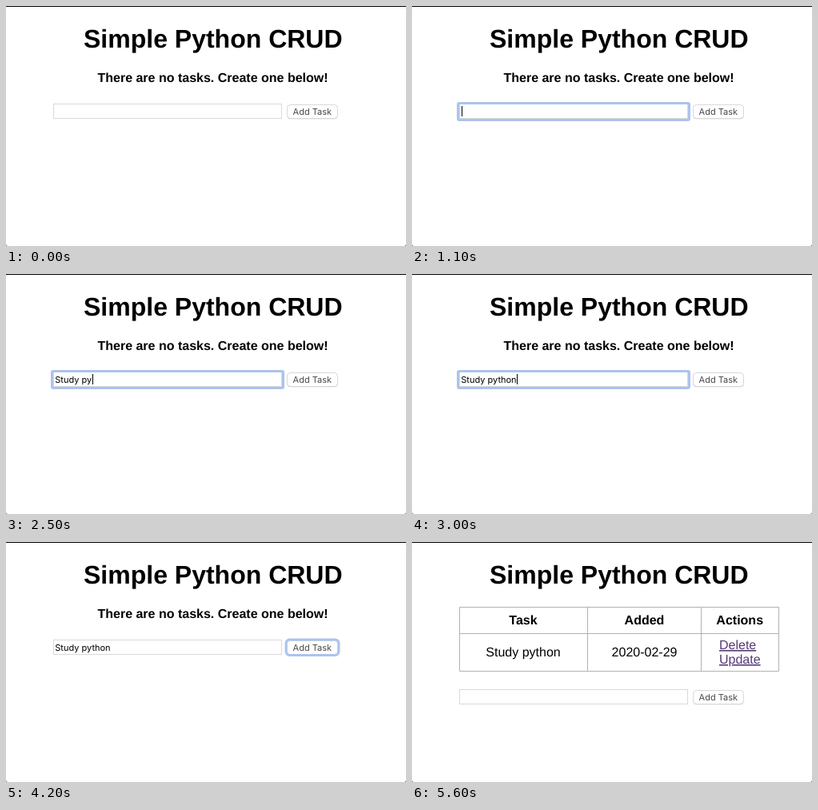
These frames come from a looping animation (500 px wide and 300 px high, 8 s). An HTML page:

```html
<!DOCTYPE html>
<html lang="en">
<head>
<meta charset="utf-8">
<title>Simple Python CRUD</title>
<style>
  html, body { margin: 0; width: 100%; height: 100%; overflow: hidden; background: #fff; }
  svg { display: block; width: 500px; height: 300px; text-rendering: geometricPrecision; }
  text { font: 16px "Liberation Sans", Arial, sans-serif; text-anchor: middle; }
  .bold { font-weight: bold; }
  .title { font-size: 32px; font-weight: bold; }
  .ui text { font: 11px Inter, sans-serif; text-anchor: start; }
  .link { fill: #553a78; text-anchor: start; text-decoration: underline; }
  .grid { fill: none; stroke: #b2b2b2; }
  .ring { fill: none; stroke: #adc3ee; stroke-width: 3; }
</style>
</head>
<body>
<svg viewBox="0 0 500 300">
  <rect width="500" height="1"/>
  <path d="M0 298v2h2zM500 298v2h-2z" fill="#999"/>
  <text class="title" x="258.8" y="52">Simple Python CRUD</text>

  <text id="empty" class="bold" x="258.5" y="95">There are no tasks. Create one below!</text>

  <g id="table">
    <path class="grid" d="M59.5 81.5h399v80h-399zM59.5 114.5h399M219.5 81.5v80M361.5 81.5v80"/>
    <text class="bold" x="139" y="103">Task</text>
    <text class="bold" x="290.5" y="103">Added</text>
    <text class="bold" x="409.7" y="103">Actions</text>
    <text x="139" y="143">Study python</text>
    <text x="290.5" y="143">2020-02-29</text>
    <text class="link" x="384" y="134">Delete</text>
    <text class="link" x="384" y="152">Update</text>
  </g>

  <g id="form" class="ui">
    <rect x="59.5" y="122.5" width="285" height="18" fill="#fff" stroke="#d9d9d9"/>
    <rect id="inputRing" class="ring" x="57.5" y="121.5" width="289" height="21" rx="1.5"/>
    <text id="value" x="61.3" y="136"></text>
    <rect id="caret" y="125" width="1" height="13"/>
    <rect x="351.5" y="124" width="63" height="17.3" rx="4" fill="#c4c4c4"/>
    <rect x="351.5" y="123.5" width="63" height="17" rx="4" fill="#fff" stroke="#d8d8d8"/>
    <rect id="buttonRing" class="ring" x="350" y="122" width="66" height="19.5" rx="4.5"/>
    <text x="358.6" y="136" fill="#484848">Add Task</text>
  </g>
</svg>
<script>
  const LOOP = 8000, FOCUS = 100, BLUR = 4200, SAVED = 5600;
  const TASK = "Study python";
  // [time, letters typed so far]
  const KEYS = [[1300, 1], [1700, 2], [1800, 3], [1900, 4], [2000, 5], [2100, 6],
                [2300, 7], [2500, 8], [2700, 10], [2800, 11], [3000, 12]];
  const CARET_OFF = [[600, 1100], [3500, 4000]];

  const el = id => document.getElementById(id);
  const show = (id, on) => el(id).style.display = on ? "" : "none";

  function draw(t) {
    const saved = t >= SAVED;
    const typing = t >= FOCUS && t < BLUR;
    const typed = KEYS.reduce((n, [at, count]) => t >= at ? count : n, 0);
    const value = el("value");
    value.textContent = saved ? "" : TASK.slice(0, typed).replace(/ $/, "\u00a0");

    show("empty", !saved);
    show("table", saved);
    show("inputRing", typing);
    show("buttonRing", t >= BLUR && !saved);
    show("caret", typing && !CARET_OFF.some(([from, to]) => t >= from && t < to));
    const width = typed ? value.getComputedTextLength() : 0;
    el("caret").setAttribute("x", Math.round(61.8 + width));
    el("form").setAttribute("transform", `translate(0 ${saved ? 62 : 0})`);
  }

  const start = performance.now();
  function tick() {
    draw((performance.now() - start) % LOOP);
    requestAnimationFrame(tick);
  }
  tick();
</script>
</body>
</html>
```
